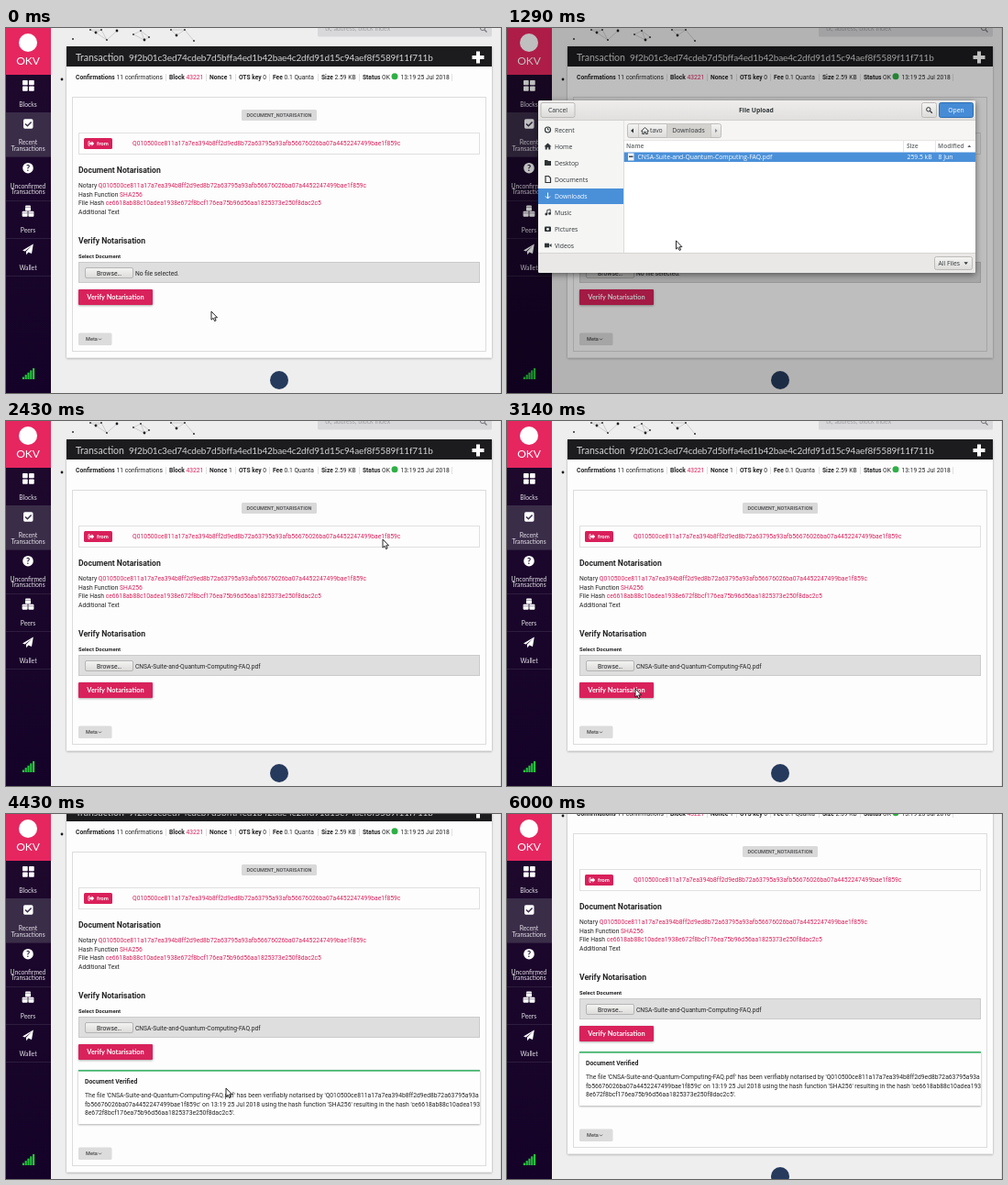
These frames come from a looping animation (540 px wide and 398 px high, 6.28 s). An HTML page:

```html
<!DOCTYPE html>
<html lang="en">
<head>
<meta charset="utf-8">
<title>Document notarisation</title>
<style>
html, body { margin: 0; width: 100%; height: 100%; overflow: hidden; background: #efeeef; }
svg { display: block; width: 540px; height: 398px; }
text { white-space: pre; }
.r { font-family: Roboto, sans-serif; }
.l { font-family: Lato, sans-serif; }
.o { font-family: "Open Sans", sans-serif; font-weight: 500; }
.b { font-weight: 700; }
</style>
</head>
<body>
<svg id="stage" viewBox="0 0 540 398" xmlns="http://www.w3.org/2000/svg"></svg>
<script>
const LOOP = 6280, FPS = 7;
const PINK = '#d9205b', INK = '#242426', BLUE = '#4a90d9';
const ADDRESS = 'Q010500ce811a17a7ea394b8ff2d9ed8b72a63795a93afb56676026ba07a4452247499bae1f859c';
const FILE_HASH = 'ce6618ab88c10adea1938e672f8bcf176ea75b96d56aa1825373e250f8dac2c5';
const TX = '9f2b01c3ed74cdeb7d5bffa4ed1b42bae4c2dfd91d15c94aef8f5589f11f711b';
const FILE = 'CNSA-Suite-and-Quantum-Computing-FAQ.pdf';

// Drawing helpers
const rect = (x, y, w, h, fill, more = '') =>
  `<rect x="${x}" y="${y}" width="${w}" height="${h}" fill="${fill}" ${more}/>`;
const box = (x, y, w, h, fill, stroke, r = 0) =>
  rect(x + .5, y + .5, w - 1, h - 1, fill, `stroke="${stroke}" rx="${r}"`);
const circle = (x, y, r, fill) => `<circle cx="${x}" cy="${y}" r="${r}" fill="${fill}"/>`;
const path = (d, fill, more = '') => `<path d="${d}" fill="${fill}" ${more}/>`;
const line = (d, color, w = 1, more = '') =>
  path(d, 'none', `stroke="${color}" stroke-width="${w}" ${more}`);
const text = (x, y, str, size, fill = INK, cls = 'r', more = '') =>
  `<text x="${x}" y="${y}" font-size="${size}" fill="${fill}" class="${cls}" ${more}>${str}</text>`;
const mid = (x, y, str, size, fill, cls) => text(x, y, str, size, fill, cls, 'text-anchor="middle"');
const span = (str, fill) => `<tspan fill="${fill}">${str}</tspan>`;
const strong = str => `<tspan font-weight="700">${str}</tspan>`;
const group = (id, body) => `<g id="${id}">${body}</g>`;

function network() {
  const dots = [[61, 56], [73, 12], [92, 2], [98, 5], [104, 2], [110, 13], [121, 3], [139, 7],
    [147, 3], [151, 13], [156, 10], [180, 2], [186, 8], [195, 2], [205, 14]];
  let out = '';
  dots.forEach(([x, y], i) => {
    out += circle(x, y, i % 3 ? .9 : 1.4, '#1b1b1d');
    dots.slice(i + 1).forEach(([u, v]) => {
      if (Math.hypot(u - x, v - y) < 17) out += line(`M${x} ${y}L${u} ${v}`, '#77777b', .3);
    });
  });
  return out;
}

function stats() {
  const items = [[76, 'Confirmations', '11 confirmations'], [178, 'Block', span('43221', PINK)],
    [222, 'Nonce', '1'], [254, 'OTS key', '0'], [291, 'Fee', '0.1 Quanta'],
    [344, 'Size', '2.59 KB'], [389, 'Status', 'OK']];
  return items.map(([x, k, v], i) =>
    text(x, 56.3, `${strong(k)} ${v}`, 6.7) +
    (i ? rect(x - 4, 50, .7, 8, '#d4d4d4') : '')).join('') +
    circle(424, 52.8, 3.5, '#2faf45') + text(430.5, 56.3, '13:19 25 Jul 2018', 6.7) +
    rect(486, 50, .7, 8, '#d4d4d4');
}

function page() {
  const details = [['Notary', ADDRESS], ['Hash Function', 'SHA256'], ['File Hash', FILE_HASH], ['Additional Text', '']];
  return network() +
    rect(340, -6, 190, 15.5, '#d8d8da', 'rx="1.5"') +
    text(348, 3, 'tx, address, block index', 7, '#a0a0a4', 'l') +
    `<circle cx="520" cy="0" r="2.6" fill="none" stroke="#77777b"/>` + line('M522 2L524.5 4.5', '#77777b', 1.3) +
    rect(66, 20, 464, 339.5, '#fdfdfd', 'id="card" filter="url(#soft)"') +
    rect(66, 20, 464, 22, '#1c1c1e') +
    text(76, 35.5, 'Transaction', 10.5, '#d2d2d4', 'l') +
    text(134, 35.5, TX, 10, '#d2d2d4', 'l', 'letter-spacing="-.14"') +
    line('M515 25.5V38.5M508.5 32H521.5', '#fff', 4) +
    stats() +
    rect(72.5, 75.5, 451, 277, 'none', 'id="panel" stroke="#dcdcdc"') +
    rect(257, 89, 82, 12, '#d9d9da', 'rx="1.5"') +
    mid(298, 97, 'DOCUMENT_NOTARISATION', 5.5, '#5a5a5c', 'r b') +
    box(79, 114, 438, 24, 'none', '#e0e0e0') +
    rect(85, 120, 31, 12, PINK, 'rx="1.5"') +
    path('M91 124.8h2.6v-1.5l2.5 2.7-2.5 2.7v-1.5H91z', '#fff') +
    line('M91.5 123.7H90v4.6h1.5', '#fff', .8) +
    text(99, 128.2, 'from', 6, '#fff', 'l b') +
    text(138, 128.2, ADDRESS, 6.75, PINK) +
    text(79, 158, 'Document Notarisation', 8.65, INK, 'r b') +
    details.map(([k, v], i) => text(79, 174 + i * 9.5, `${k} ${span(v, PINK)}`, 6.75)).join('') +
    text(79, 235, 'Verify Notarisation', 8.65, INK, 'r b') +
    text(79, 251.2, 'Select Document', 6, INK, 'r b') +
    box(79, 255, 438, 23, '#dedede', '#cacaca') +
    box(86, 261, 53, 12, 'url(#grey)', '#b5b5b5', 1.5) +
    mid(112.5, 269.7, 'Browse…', 6.8, INK, 'r') +
    text(141, 269.7, '', 6.7, INK, 'r', 'id="file"') +
    rect(79, 285, 81, 17, PINK, 'rx="1" filter="url(#soft)"') +
    mid(119.5, 296.3, 'Verify Notarisation', 7.4, '#fff', 'l b') +
    group('result', rect(79, 313, 438, 59, '#fefefe', 'filter="url(#soft)"') +
      rect(79, 313, 438, 1.7, '#41b56b') +
      text(86, 327.6, 'Document Verified', 6.85, INK, 'r b') +
      [`The file '${FILE}' has been verifiably notarised by '${ADDRESS.slice(0, 45)}`,
       `${ADDRESS.slice(45)}' on 13:19 25 Jul 2018 using the hash function 'SHA256' resulting in the hash '${FILE_HASH.slice(0, 20)}`,
       `${FILE_HASH.slice(20)}'.`].map((s, i) => text(86, 343.3 + i * 9.5, s, 6.75)).join('')) +
    group('below', rect(79, 332.5, 36.5, 13.5, '#dcdcdc', 'rx="1.5"') +
      text(87, 341.4, 'Meta', 5.6, '#5a5a5c', 'r b') +
      line('M101 338.6l1.5 1.5 1.5-1.5', '#5a5a5c', .9) +
      circle(298, 384, 10, '#253a5c'));
}

function sidebar() {
  const labels = [[86, 'Blocks'], [127.4, 'Recent'], [133.9, 'Transactions'], [174.9, 'Unconfirmed'],
    [181.4, 'Transactions'], [222.6, 'Peers'], [263.5, 'Wallet']];
  const cube = (x, y) => rect(x, y, 6, 6, '#fff', 'rx="1"') + line(`M${x} ${y + 2}h6`, '#1d0a2c', .4);
  return rect(0, 0, 49, 398, 'url(#night)') +
    rect(0, 0, 49, 51, '#e6265f') +
    circle(24, 16, 10, '#fff') + mid(24, 40, 'OKV', 12, '#fff', 'l') +
    rect(0, 92, 49, 48, '#3a2d48') +
    [92, 140, 188, 229, 270].map(y => rect(0, y, 49, .6, '#3b2d4a')).join('') +
    [[18, 57], [25, 57], [18, 63.5], [25, 63.5]].map(([x, y]) => rect(x, y, 5.7, 5.3, '#fff', 'rx=".7"')).join('') +
    rect(19, 99.2, 10.5, 10.5, '#fff', 'rx="1.6"') + line('M21 104.5l2.4 2.3 4.2-4.4', '#3a2d48', 1.5) +
    circle(24, 152.7, 5.8, '#fff') + mid(24, 156, '?', 9, '#1d0a2c', 'l b') +
    cube(21, 193.4) + cube(17.6, 199.8) + cube(24.4, 199.8) +
    path('M18 242.5L29.8 235.5 28 246 24.3 244.4 22.3 247.2 21.8 243.7 28 237.6 20.6 243.4z', '#fff') +
    labels.map(([y, s]) => mid(24, y, s, 6.8, '#e6e2ea', 'l')).join('') +
    [0, 1, 2, 3, 4].map(i => rect(17.8 + i * 2.8, 380.5 - i * 2.4, 2.2, 2.5 + i * 2.4, '#24c43c')).join('');
}

function dialog() {
  const button = (x, y, w, h, label) =>
    box(x, y, w, h, 'url(#grey)', '#bdbbb8', 2) + mid(x + w / 2, y + h / 2 + 2.4, label, 6.8, '#2e3436', 'o');
  const places = ['Recent', 'Home', 'Desktop', 'Documents', 'Downloads', 'Music', 'Pictures', 'Videos'];
  const house = (x, y) => `M${x} ${y}l4-3.8 4 3.8h-1.2v3.2h-2v-2.2h-1.6v2.2h-2v-3.2z`;
  const icon = (i, y) => [
    c => `<circle cx="44.5" cy="${y}" r="3" fill="none" stroke="${c}" stroke-width="1.2"/>` + line(`M44.5 ${y - 2}v2h1.6`, c, .9),
    c => path(house(40.5, y + .3), c),
    c => path(`M41 ${y - 3}h3l1 1h3v5h-7z`, c),
    c => path(`M42 ${y - 3.5}h3.5l2 2v5h-5.5z`, 'none', `stroke="${c}" stroke-width="1.2"`),
    c => line(`M44.5 ${y - 3.5}v6.5M42 ${y + .5}l2.5 2.5 2.5-2.5`, c),
    c => circle(42.8, y + 2, 1.4, c) + circle(46.6, y + 1.4, 1.4, c) + line(`M43.8 ${y + 2}v-4.5l3.4-.7v4.5`, c, .9),
    c => rect(41, y - 2.5, 7, 5.5, c, 'rx="1"') + circle(44.5, y + .3, 1.4, '#f5f5f4'),
    c => rect(41, y - 2.3, 5, 4.6, c) + path(`M46 ${y}l2.5-2v4z`, c)
  ][i];
  return rect(34, 79, 477, 188, '#fff', 'rx="2" filter="url(#deep)"') +
    path('M34 101V81.5q0-2.5 2.5-2.5h472q2.5 0 2.5 2.5V101z', 'url(#bar)') +
    rect(34, 100.5, 477, .7, '#c4c2bf') +
    button(36.5, 81, 38, 17, 'Cancel') + mid(272, 92.4, 'File Upload', 6.8, '#2e3436', 'o b') +
    button(452, 81, 17, 17, '') +
    `<circle cx="459.8" cy="88.8" r="2.2" fill="none" stroke="#2e3436"/>` + line('M461.4 90.4l2.4 2.4', '#2e3436', 1.3) +
    box(471, 81, 38, 17, '#458bd5', '#2f6fb3', 2) + mid(490, 92.3, 'Open', 6.8, '#fff', 'o') +
    rect(34, 101, 93, 144, '#f5f5f4') + rect(127, 101, .7, 144, '#cfcdca') +
    rect(34, 175, 93, 17, BLUE) +
    places.map((s, i) => {
      const y = 111 + i * 18, c = i === 4 ? '#fff' : '#2e3436';
      return icon(i, y)(c) + text(52, y + 2.5, s, 6.8, c, 'o');
    }).join('') +
    rect(127.7, 101, 383.3, 21, '#f6f5f4') +
    box(131, 104, 103, 16, 'url(#grey)', '#c0beba', 2) + rect(174, 104.5, 48, 15, '#d4d2cf') +
    [143, 174, 222].map(x => rect(x, 104.5, .7, 15, '#c0beba')).join('') +
    path('M138 109.5v5l-3-2.5z', '#2e3436') + path('M227 109.8v4.4l2.6-2.2z', '#8b8e8f') +
    path(house(146.5, 112.3), 'none', 'stroke="#2e3436" stroke-width=".9"') + text(156, 114.4, 'tavo', 6.8, '#2e3436', 'o') +
    mid(198, 114.4, 'Downloads', 6.8, '#2e3436', 'o') +
    rect(127.7, 122, 383.3, .6, '#d8d6d3') +
    text(130, 131, 'Name', 6.5, '#7b7e7f', 'o b') + text(436, 131, 'Size', 6.5, '#7b7e7f', 'o b') +
    text(470, 131, 'Modified', 6.5, '#7b7e7f', 'o b') + path('M502.4 130l1.9-2.4 1.9 2.4z', '#5e6263') +
    rect(432, 123, .6, 12, '#d8d6d3') + rect(467, 123, .6, 12, '#d8d6d3') +
    rect(127.7, 135.5, 383.3, 10.5, BLUE) +
    rect(132, 136.5, 6.5, 8, '#f4f4f4') + rect(133, 139.5, 4.5, 1.5, '#3c4a5c') +
    text(142.5, 143, FILE, 6.8, '#fff', 'o') + text(436.5, 143, '259.5 kB', 6.8, '#fff', 'o') +
    text(470.5, 143, '8 Jun', 6.8, '#fff', 'o') +
    path('M34 245H511V265q0 2-2 2H36q-2 0-2-2z', '#e9e8e6') + rect(34, 245, 477, .7, '#cfcdca') +
    box(466, 249, 42, 15, 'url(#grey)', '#bdbbb8', 2) + text(470.5, 259, 'All Files', 6.8, '#2e3436', 'o') +
    path('M498.5 255.3h4.4l-2.2 2.7z', '#2e3436');
}

const gradient = (id, a, b) =>
  `<linearGradient id="${id}" x2="0" y2="1"><stop stop-color="${a}"/><stop offset="1" stop-color="${b}"/></linearGradient>`;
const shadow = (id, dy, blur, alpha) =>
  `<filter id="${id}" x="-10%" y="-20%" width="120%" height="150%"><feDropShadow dx="0" dy="${dy}" stdDeviation="${blur}" flood-opacity="${alpha}"/></filter>`;

const $ = id => document.getElementById(id);
const RESIZE = 'M0-8V-3M-2.6-4.8L0-2.2 2.6-4.8M-4-3V0H4V-3';
$('stage').innerHTML = '<defs>' +
  gradient('grey', '#f4f4f3', '#dcdbd9') + gradient('bar', '#eeedec', '#e0dfdd') +
  gradient('night', '#1f0a2d', '#150228') +
  shadow('soft', .8, 1.3, .35) + shadow('deep', 2, 3.5, .5) + '</defs>' +
  rect(0, 0, 540, 398, '#efeeef') +
  group('page', page()) + rect(539, 0, 1, 398, '#dcdcdd') + sidebar() +
  rect(0, 0, 540, 398, '#000', 'id="dim"') + group('dialog', dialog()) +
  group('cursor',
    path('M0 0V9.2L2.1 7.3 3.6 10.6 5.1 9.9 3.7 6.8H6.5z', '#fff', 'id="arrow" stroke="#111" stroke-width=".9"') +
    group('resize', line(RESIZE, '#222', 2.6) + line(RESIZE, '#fff', 1.1)));

// Tracks: [time, ...values], linear in between
const POINTER = [[0, 224, 309], [140, 208, 302], [430, 125, 266], [1140, 125, 266], [1430, 240, 200],
  [1860, 480, 98], [2000, 499, 89], [2290, 499, 89], [2430, 411, 129], [2710, 205, 265],
  [2860, 140, 292], [3430, 140, 292], [3860, 186, 292], [4290, 240, 299]];
const SCROLL = [[4140, 0], [4290, 10], [4430, 34], [4570, 49], [4710, 54]];
const DIM = [[860, .04], [1000, .11], [1430, .32]];

function at(track, t) {
  const n = track.findIndex(k => k[0] > t);
  if (n < 0) return track[track.length - 1].slice(1);
  if (n === 0) return track[0].slice(1);
  const a = track[n - 1], b = track[n], p = (t - a[0]) / (b[0] - a[0]);
  return a.slice(1).map((v, i) => v + (b[i + 1] - v) * p);
}
const show = (id, on) => $(id).setAttribute('display', on ? 'inline' : 'none');

function render(now) {
  const step = Math.floor((now % LOOP + 5) * FPS / 1000);
  const t = Math.round(step * 100 / FPS) * 10;
  const open = t >= 860 && t < 2430, verified = t >= 3430;
  const grow = verified ? 65 : 0, edge = open && t <= 1140;
  const [x, y] = at(POINTER, t);
  $('page').setAttribute('transform', `translate(0 ${-Math.round(at(SCROLL, t)[0])})`);
  $('below').setAttribute('transform', `translate(0 ${grow})`);
  $('card').setAttribute('height', 339.5 + grow);
  $('panel').setAttribute('height', 277 + grow);
  $('file').textContent = t < 2430 ? 'No file selected.' : FILE;
  $('dim').setAttribute('opacity', open ? at(DIM, t)[0] : 0);
  $('cursor').setAttribute('transform', `translate(${x} ${y})`);
  show('dialog', open);
  show('result', verified);
  show('cursor', t < 4710);
  show('arrow', !edge);
  show('resize', edge);
}

function tick() {
  render(performance.now());
  requestAnimationFrame(tick);
}
tick();
</script>
</body>
</html>
```
